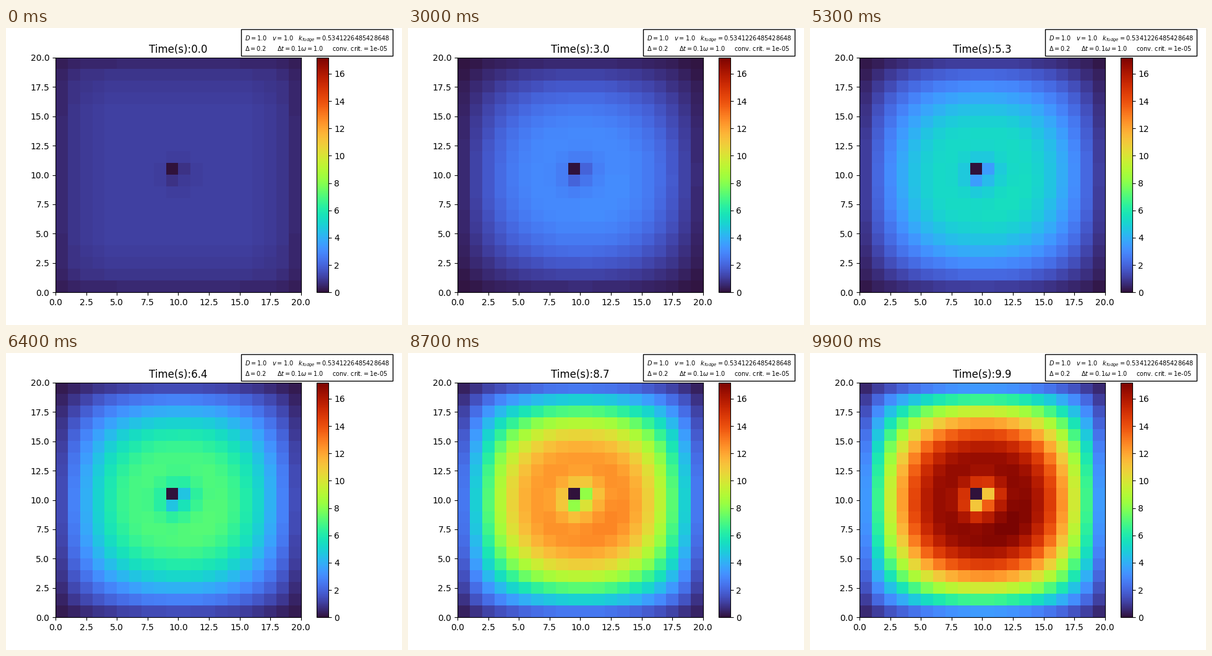
These frames come from a looping animation (640x480 px, 10000 ms). A matplotlib script:

```python
import numpy as np
import matplotlib.pyplot as plt
from matplotlib.animation import FuncAnimation

N = 20             # cells per side
D, V = 1.0, 1.0
DELTA, DT = 0.2, 0.1
OMEGA, CONV = 1.0, 1e-05
K_FUDGE = 0.5341226485428648
FRAMES = 100
PEAK = 17.17       # highest flux at the end of the run
ROD = (10, 9)      # row, column


def cell(row, col):
    return row * N + col


def step_matrix():
    """Implicit diffusion step with zero flux outside the square."""
    lap = 2 * np.eye(N) - np.eye(N, k=1) - np.eye(N, k=-1)
    eye = np.eye(N)
    a = np.eye(N * N) + V * D * DT / DELTA**2 * (np.kron(lap, eye) + np.kron(eye, lap))
    # The sweep clears the rod, so cells visited before it see zero there.
    r, c = ROD
    a[[cell(r, c + 1), cell(r - 1, c)], cell(r, c)] = 0
    m = np.linalg.inv(a)
    m[cell(r, c)] = 0
    return m


def simulate():
    m = step_matrix()
    phi = np.ones(N * N)
    history = []
    for _ in range(FRAMES):
        phi = m @ phi
        history.append(phi.reshape(N, N))
    growth = (PEAK / phi.max()) ** (1 / FRAMES)
    return [f * growth ** (i + 1) for i, f in enumerate(history)]


flux = simulate()

fig, ax = plt.subplots(figsize=(6.4, 4.8), dpi=100)
fig.subplots_adjust(left=0.125, right=0.9, bottom=0.11, top=0.9)
im = ax.imshow(flux[0], cmap="turbo", vmin=0, vmax=PEAK, origin="lower",
               extent=(0, N, 0, N), aspect="auto", interpolation="nearest")
fig.colorbar(im, ax=ax)
title = ax.set_title("Time(s):0.0")

info = (f"$D={D}$   $v={V}$   $k_{{fudge}}={K_FUDGE}$\n"
        f"$\\Delta={DELTA}$      $\\Delta t={DT}$$\\omega={OMEGA}$"
        f"     conv. crit.$=${CONV}")
fig.text(385.6 / 640, 1 - 25 / 480, info, fontsize=7, va="center",
         bbox=dict(facecolor="white", edgecolor="black"))


def update(i):
    im.set_data(flux[i])
    title.set_text(f"Time(s):{i * DT:.1f}")
    return im, title


anim = FuncAnimation(fig, update, frames=FRAMES, interval=100, repeat=True)
plt.show()
```
